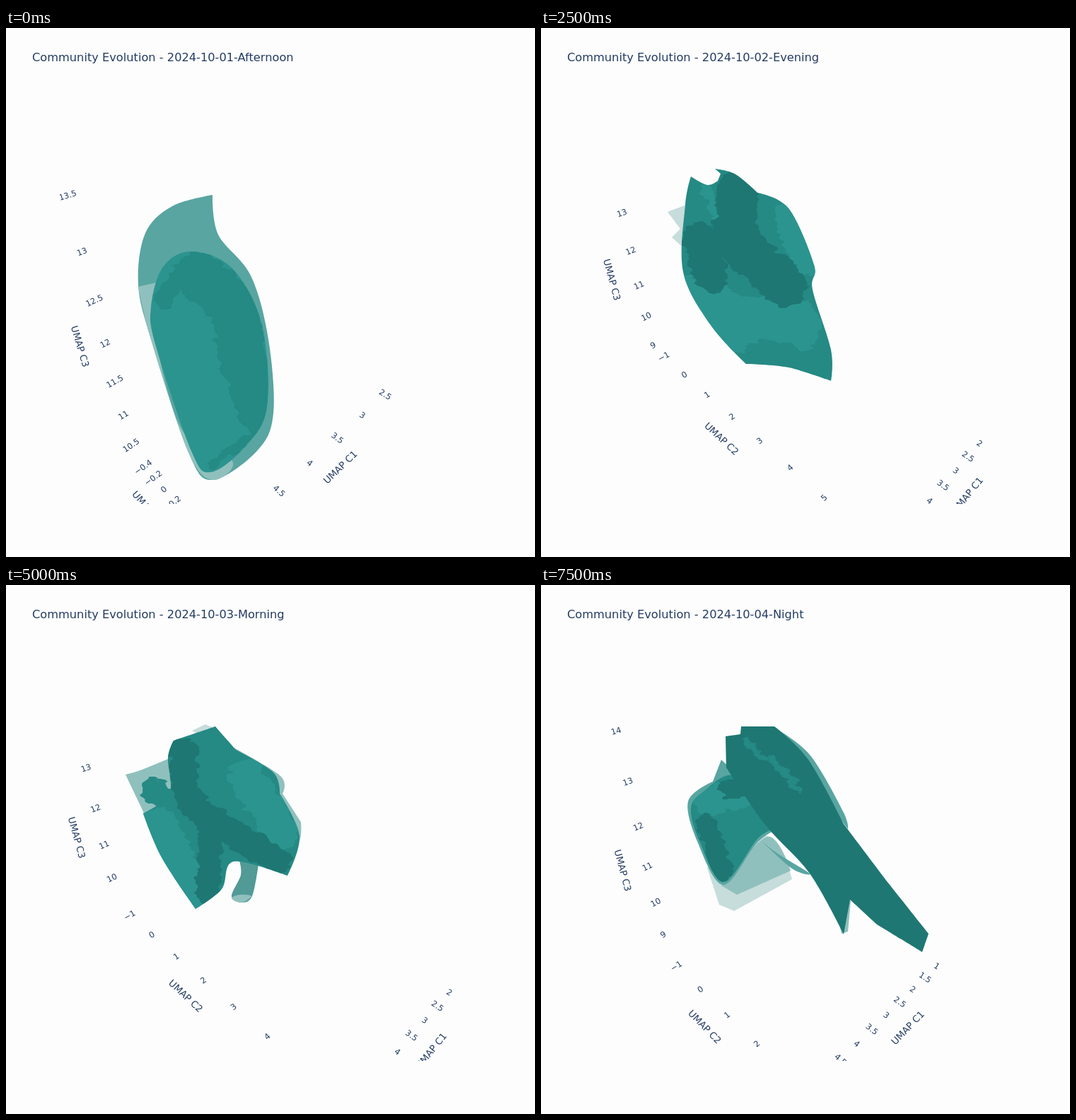
An HTML page that plays this animation: 748 by 748 pixels, repeating every 8 s.

```html
<!DOCTYPE html>
<html lang="en">
<head>
<meta charset="utf-8">
<title>Community Evolution</title>
<style>
  html, body { margin: 0; width: 100%; height: 100%; overflow: hidden; background: #fdfdfd; }
  svg { display: block; width: 748px; height: 748px; }
  text { font-family: "DejaVu Sans", Verdana, sans-serif; fill: #243c64; }
  .title { font-size: 16.23px; }
  .tick { font-size: 11.4px; text-anchor: middle; }
  .name { font-size: 13.3px; text-anchor: middle; }
  .scene { visibility: hidden; animation: show 8s step-end infinite; }
  @keyframes show {
    0% { visibility: visible; }
    6.25%, 100% { visibility: hidden; }
  }
</style>
</head>
<body>
<svg id="stage" viewBox="0 0 748 748" xmlns="http://www.w3.org/2000/svg">
  <defs>
    <clipPath id="plot"><rect x="76" y="95" width="596" height="578"/></clipPath>
    <filter id="rough" filterUnits="userSpaceOnUse" x="0" y="0" width="748" height="748" color-interpolation-filters="sRGB">
      <feTurbulence type="fractalNoise" baseFrequency=".05 .1" numOctaves="2" seed="4"/>
      <feDisplacementMap in="SourceGraphic" scale="18" xChannelSelector="R" yChannelSelector="G"/>
    </filter>
  </defs>
</svg>
<script>
const NS = 'http://www.w3.org/2000/svg';
const STEP = 0.5, COUNT = 16;

// Tones from dark teal to the page colour
const tones = {
  a: '#1e7773', b: '#258984', c: '#2b948f', d: '#59a5a1',
  e: '#90c0bd', f: '#c6dddb', g: '#519a96', w: '#fdfdfd'
};

// A line is a body: tone, rim width, key points ("!" marks a corner).
// A "+" line is a ragged ribbon of shade inside the body above: tone, width, path.
const blobs = {
  shell: `
d 187,362 197,290 235,252 292,236! 300,292 346,350 371,440 378,545 355,598 292,639 258,600 205,440
e 187,366! 212,360! 212,440 250,570 320,612 292,639 258,600 205,440
c 205,395 222,338 262,316 320,340 362,420 369,535 340,590 290,628 262,598 212,450
+b68 275,350 322,400 336,470 364,540
+b24 222,385 255,335
+b14 290,618 350,575`,
  pair: `
e 250,295 275,270 290,230! 340,217 378,222! 410,258 430,300 330,300
+d22 345,245 375,255
f 289,230 340,217 377,222 335,236
w 291,281 323,271 357,279 310,290
f 205,395! 225,470 264,558! 330,525
c14 206,355 230,313 290,306 330,303 380,275 416,263 426,298 400,347 360,364 293,423 240,415
+b60 230,375 270,400 310,375
+b30 360,350 405,340
+d36 385,308 410,300
e 447,360! 480,351 511,354! 508,380!
b6 230,448 270,432 330,432 385,385 450,363 500,367! 536,400! 524,450! 420,475 345,522 300,525 255,505
+a50 405,420 500,435
+c28 475,385 510,390
+c34 370,450 385,470
+a22 285,500 340,497`,
  sheet: `
b 206,311! 280,276 385,268 445,290 455,315 440,350 442,366! 475,366! 440,440! 413,470! 345,427 280,434 225,395 222,340
+c25 225,330 235,395
+a50 280,370 350,385 410,450
+c28 345,325 375,365 435,435
+a12 235,298 320,277 400,277`,
  cone: `
f 179,260! 205,250! 206,315! 185,296! 197,284!
b 201,345 204,250 212,210! 235,222 250,216! 254,206! 246,199! 275,207 306,233! 350,255 386,335 384,370 410,455 410,499! 350,480 290,475! 240,420
+c80 215,390 290,420 355,420
+c34 345,265 372,335
+a62 280,230 280,300 345,365
+a50 225,300 240,350
+c12 235,225 245,265
+b22 300,455 345,455 395,490`,
  saddle: `
e 169,268! 190,262 229,246! 235,300 195,322!
+b34 205,290 225,300
g 330,390! 357,395! 348,440 333,449 319,440 332,410
e 319,443 330,438 347,440 333,449
f 263,206! 282,197! 296,203! 285,218!
e 322,230! 388,270 391,295! 417,335! 405,360
b 194,323! 231,295 229,245 237,220! 296,200! 325,233! 378,265 387,295! 415,355 398,411! 322,391 305,430 268,458! 220,385
+c60 215,345 255,430
+c50 340,270 390,350
+a38 250,235 265,310 385,390
+a34 290,350 285,435`,
  cape: `
f 262,475! 308,531 363,450!
b 210,362! 250,310 262,247! 360,244 430,275 455,330! 484,390 468,466! 375,446 304,506! 262,478! 225,395
+c50 225,345 250,320
+a70 320,290 390,300 400,420
+a30 255,410 300,350
+c100 290,450 322,405
+c45 460,350 455,440
+a14 460,405 475,415`,
  lobe: `
f 235,400! 252,452! 273,461! 355,416! 320,355
e 255,425! 277,438! 353,404! 320,356
d 208,306 243,278! 255,247! 300,290 345,330 305,365 258,424 222,365
b 212,316 230,292 275,270 335,330 305,360 258,420 224,362
+c40 235,305 285,295
+a30 235,340 255,405
+a28 265,288 285,288`,
  ridge: `
d 312,362! 335,380 380,408 355,401
e 425,493! 434,490! 438,446! 415,450!
d 330,202! 380,240 427,320 434,345! 360,245
a 261,214! 282,211! 283,200! 330,200! 378,247 428,338! 490,420! 548,493! 539,519! 475,480! 437,445! 428,494! 380,408 318,340 262,258!
+b10 290,220 315,245
+b10 325,245 365,290`
};

// Data range of each plot: low and high of C1, C2, C3
const ranges = {
  small: [[2.41, 5.37], [-.588, .897], [10.29, 14]],
  wide: [[1.61, 5.44], [-1.12, 2.1], [10.29, 14.09]],
  wider: [[1.6, 5.46], [-1.35, 2.1], [10.3, 14.15]],
  long: [[1.54, 5.45], [-1.52, 6.55], [8.91, 14.29]],
  tall: [[1.8, 5.53], [-1.54, 6], [9.09, 14.14]],
  mid: [[1.73, 5.47], [-1.38, 3.57], [9.6, 14.06]],
  deep: [[.735, 5.465], [-1.335, 3.47], [8.18, 14.39]]
};

const moved = ['pair', 'matrix(.972 0 0 .974 18 17)'];
const grown = ['saddle', 'matrix(1.234 0 0 1.232 -30.5 -37)'];
const nudged = ['saddle', 'translate(13 22)'];
const shell = ['small', ['shell']], cone = ['long', ['cone']], saddle = ['tall', ['saddle']];
const ridge = ['deep', nudged, ['ridge']];
const scenes = [
  shell, shell, ['wide', ['pair']], ['wider', moved],
  ['wider', moved, ['sheet']], cone, cone, cone,
  cone, saddle, saddle, ['mid', grown],
  ['mid', grown, ['cape']], ridge, ridge, ['deep', ['lobe'], ['ridge']]
];
const parts = ['Afternoon', 'Evening', 'Morning', 'Night'];

function add(parent, tag, attrs, text) {
  const node = document.createElementNS(NS, tag);
  for (const key in attrs) node.setAttribute(key, attrs[key]);
  if (text) node.textContent = text;
  return parent.appendChild(node);
}

// Smooth curve through the points; corners have no tangent
function curve(words, closed) {
  const pts = words.map(w => {
    const [x, y] = w.split(',').map(parseFloat);
    return { x, y, k: w.endsWith('!') ? 0 : 1 / 6 };
  });
  const n = pts.length;
  const at = i => pts[closed ? (i + n) % n : Math.max(0, Math.min(n - 1, i))];
  const handle = (i, dir) => {
    const p = at(i), a = at(i - 1), b = at(i + 1), k = p.k * dir;
    return `${p.x + (b.x - a.x) * k},${p.y + (b.y - a.y) * k}`;
  };
  return `M${pts[0].x},${pts[0].y}` + pts.slice(closed ? 0 : 1).map((_, i) =>
    `C${handle(i, 1)} ${handle(i + 1, -1)} ${at(i + 1).x},${at(i + 1).y}`).join('');
}

let clips = 0;
function drawBlob(parent, [name, transform = 'translate(0)']) {
  const group = add(parent, 'g', { transform });
  let inside;
  const stroke = (to, d, tone, width, more) => add(to, 'path', {
    d, fill: 'none', stroke: tones[tone], 'stroke-width': width,
    'stroke-linecap': 'round', 'stroke-linejoin': 'round', ...more
  });
  for (const line of blobs[name].trim().split('\n')) {
    const [style, ...words] = line.split(' ');
    if (style[0] === '+') {
      stroke(inside, curve(words, false), style[1], style.slice(2), { filter: 'url(#rough)' });
      continue;
    }
    const d = curve(words, true), rim = +style.slice(1), id = `clip${clips++}`;
    for (const part of rim ? [2, 1.4, .8] : [])
      stroke(group, d, 'c', rim * part, { 'stroke-opacity': .48 });
    add(group, 'path', { d, fill: tones[style[0]] });
    add(add(group, 'clipPath', { id }), 'path', { d });
    inside = add(group, 'g', { 'clip-path': `url(#${id})` });
  }
}

// Camera on the diagonal (1.25, 1.25, 1.25) looking at the middle of the data box
const view = { x: 374, y: 383.5, f: 696.5, far: 1.25 * Math.sqrt(3) };
const vanish = [
  [view.x + view.f * Math.sqrt(1.5), view.y - view.f * Math.sqrt(.5)],
  [view.x - view.f * Math.sqrt(1.5), view.y - view.f * Math.sqrt(.5)],
  [view.x, view.y + view.f * Math.SQRT2]
];

function project([x, y, z]) {
  const scale = view.f / (view.far - (x + y + z) / Math.sqrt(3));
  return [view.x + scale * (y - x) / Math.SQRT2, view.y - scale * (2 * z - x - y) / Math.sqrt(6)];
}

// Angle of text lying on the line to a vanishing point, read left to right
function lean([x, y], axis) {
  const [vx, vy] = vanish[axis], side = axis === 1 ? -1 : 1;
  return Math.atan2((vy - y) * side, (vx - x) * side) * 180 / Math.PI;
}

function label(parent, cls, [x, y], angle, text) {
  add(parent, 'text', { class: cls, dy: '.36em', transform: `translate(${x} ${y}) rotate(${angle})` }, text);
}

function drawGrid(parent, box) {
  const spans = box.map(([lo, hi]) => hi - lo);
  const unit = 1.093 / Math.cbrt(spans[0] * spans[1] * spans[2]);
  const [hx, hy, hz] = spans.map(span => span * unit / 2);
  const edges = [[0, hy, -hz], [hx, 0, -hz], [hx, -hy, 0]];
  const offsets = [[34, 14], [-34, 14], [-31, 21]];

  box.forEach(([lo, hi], axis) => {
    const span = spans[axis], step = span < 2 ? .2 : span < 4.78 ? .5 : 1;
    const place = value => {
      const point = [...edges[axis]];
      point[axis] = (value - (lo + hi) / 2) * unit;
      return project(point);
    };
    for (let i = Math.ceil(lo / step); i * step <= hi - span * .06; i++) {
      const at = place(i * step);
      const text = String(+(i * step).toFixed(1)).replace('-', '\u2212');
      label(parent, 'tick', at, lean(at, axis === 0 ? 1 : 0), text);
    }
    const at = place((lo + hi) / 2).map((v, i) => v + offsets[axis][i]);
    label(parent, 'name', at, lean(at, axis), `UMAP C${axis + 1}`);
  });
}

const stage = document.getElementById('stage');
scenes.forEach(([range, ...layers], i) => {
  const scene = add(stage, 'g', { class: 'scene' });
  scene.style.animationDelay = `${(i - COUNT) * STEP}s`;
  add(scene, 'text', { class: 'title', x: 37, y: 47 },
    `Community Evolution - 2024-10-0${1 + (i >> 2)}-${parts[i % 4]}`);
  const plot = add(scene, 'g', { 'clip-path': 'url(#plot)' });
  layers.forEach(layer => drawBlob(plot, layer));
  drawGrid(plot, ranges[range]);
});
</script>
</body>
</html>
```
